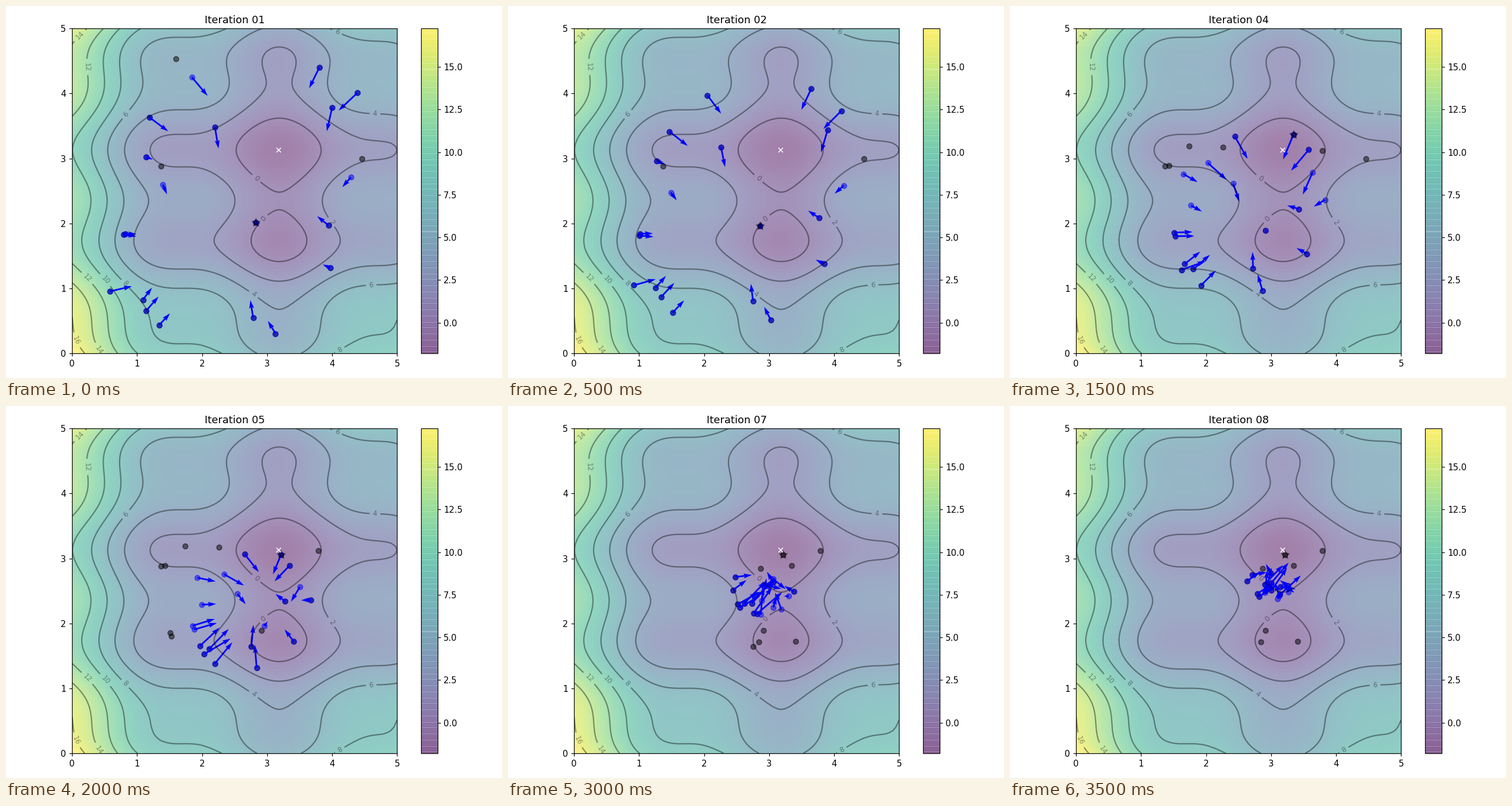
These frames come from a looping animation (864x648 px, 4 s). A matplotlib script:

```python
import numpy as np
import matplotlib.pyplot as plt
from matplotlib.animation import FuncAnimation

WIDTH, HEIGHT, DPI = 864, 648, 108
FRAMES = 8
INTERVAL = 500
PARTICLES = 20
INERTIA, PULL_OWN, PULL_BEST = 0.8, 0.1, 0.1

# Where the contour labels sit, in data units.
LABELS = [
    (0.11, 4.90), (0.25, 4.41), (0.82, 3.69), (4.08, 4.96),
    (4.66, 3.70), (2.84, 2.70), (2.94, 2.08), (4.00, 2.03),
    (0.82, 1.08), (0.52, 1.14), (0.24, 1.17), (2.79, 0.91),
    (4.60, 1.05), (0.08, 0.21), (0.42, 0.06), (4.12, 0.05),
]


def height(x, y):
    return (x - 3.14) ** 2 + (y - 2.72) ** 2 + np.sin(3 * x + 1.41) + np.sin(4 * y - 1.73)


def swarm(steps):
    """Run the particle swarm and return (pos, vel, own best, global best) per step."""
    rng = np.random.RandomState(100)
    pos = rng.rand(2, PARTICLES) * 5
    vel = rng.randn(2, PARTICLES) * 0.1
    own, score = pos.copy(), height(*pos)
    best = own[:, score.argmin()].copy()
    states = []
    for _ in range(steps):
        r1, r2 = rng.rand(2)
        vel = INERTIA * vel + PULL_OWN * r1 * (own - pos) + PULL_BEST * r2 * (best[:, None] - pos)
        pos = pos + vel
        value = height(*pos)
        better = score >= value
        own[:, better] = pos[:, better]
        score = np.minimum(score, value)
        best = own[:, score.argmin()].copy()
        states.append((pos, vel, own.copy(), best))
    return states


def place(axes, left, width, bottom=42.7, tall=566.1):
    """Put axes at a place given in pixels."""
    axes.set_position([left / WIDTH, bottom / HEIGHT, width / WIDTH, tall / HEIGHT])


# One warm-up step precedes the first visible iteration.
states = swarm(FRAMES + 1)[1:]

axis = np.linspace(0, 5, 100)
x, y = np.meshgrid(axis, axis)
z = height(x, y)
low = z.argmin()

fig, ax = plt.subplots(figsize=(WIDTH / DPI, HEIGHT / DPI), dpi=DPI)
img = ax.imshow(z, extent=[0, 5, 0, 5], origin="lower", cmap="viridis", alpha=0.5)
bar = fig.colorbar(img, ax=ax)
bar.solids.set_snap(False)  # translucent cells overlap into fine stripes
ax.plot([x.flat[low]], [y.flat[low]], marker="x", markersize=5, color="white")
contours = ax.contour(x, y, z, 10, colors="black", alpha=0.4)
ax.clabel(contours, inline=True, fontsize=8, fmt="%.0f", manual=LABELS)

pos, vel, own, best = states[0]
own_dots = ax.scatter(*own, marker="o", color="black", alpha=0.5)
dots = ax.scatter(*pos, marker="o", color="blue", alpha=0.5)
arrows = ax.quiver(*pos, *vel, color="blue", width=0.005,
                   angles="xy", scale_units="xy", scale=1)
star = ax.scatter(*best[:, None], marker="*", s=100, color="black", alpha=0.4)
ax.set_xlim(0, 5)
ax.set_ylim(0, 5)
place(ax, 115.2, 566.1)
place(bar.ax, 723.2, 28.3)


def draw(i):
    pos, vel, own, best = states[i]
    ax.set_title(f"Iteration {i + 1:02d}")
    own_dots.set_offsets(own.T)
    dots.set_offsets(pos.T)
    arrows.set_offsets(pos.T)
    arrows.set_UVC(*vel)
    star.set_offsets(best[None, :])
    return own_dots, dots, arrows, star


anim = FuncAnimation(fig, draw, frames=FRAMES, interval=INTERVAL, repeat=True, blit=False)
plt.show()
```
